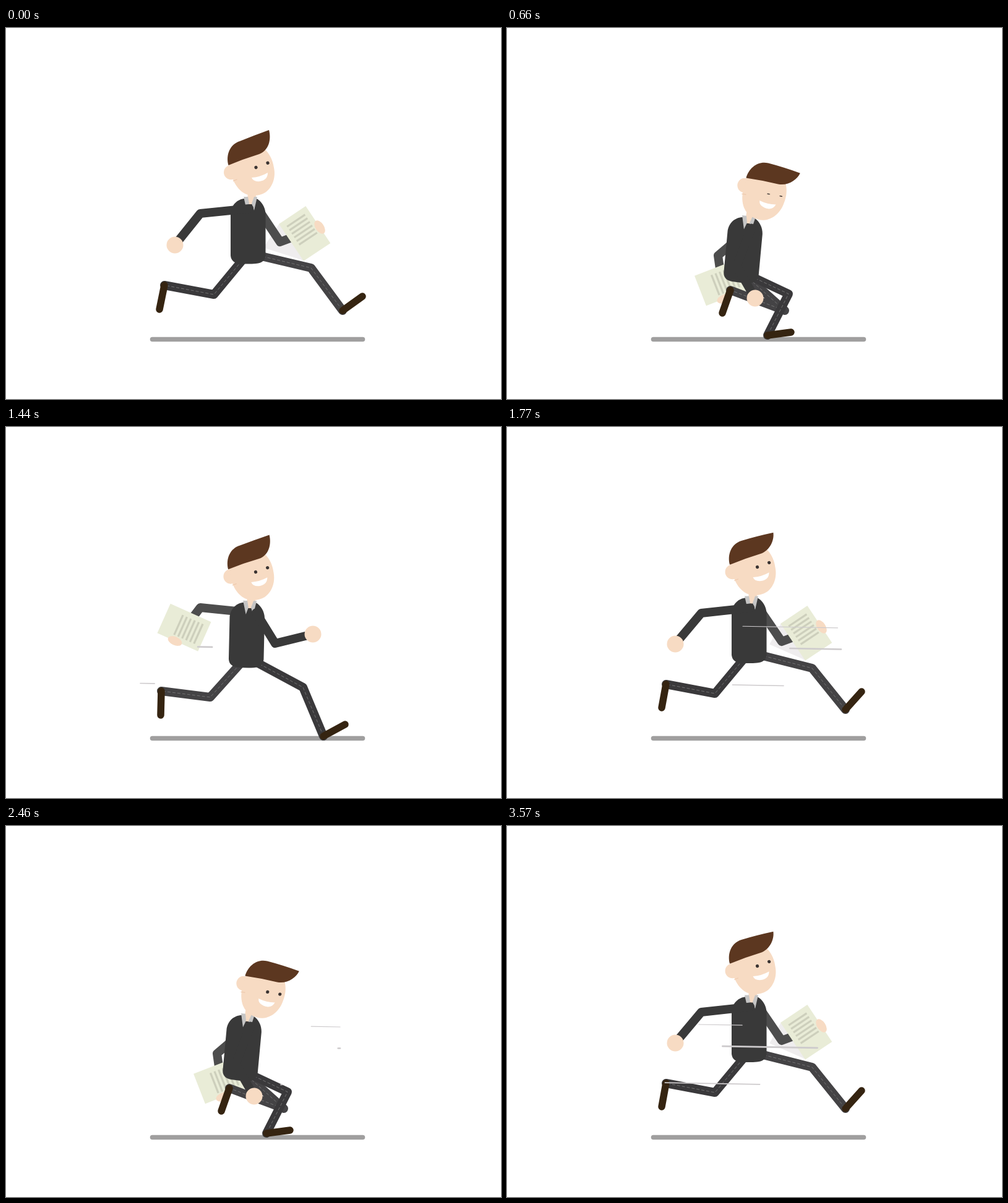
Animation, 800 px wide and 600 px high, one loop 3600 ms. Source, as an HTML page with a canvas:

```html
<!DOCTYPE html>
<html lang="en">
<head>
<meta charset="utf-8">
<title>Running man</title>
<style>
html, body { margin: 0; width: 100%; height: 100%; overflow: hidden; background: #fff; }
canvas { display: block; width: 800px; height: 600px; }
</style>
</head>
<body>
<canvas id="stage" width="800" height="600"></canvas>
<script>
const ctx = document.getElementById('stage').getContext('2d');
const LOOP = 3600, STRIDE = 900, STEP = 450, TICK = 30;
const SKIN = '#f7dbc3', SUIT = '#393939', SHOE = '#352411';
const mod = (a, n) => ((a % n) + n) % n;
const clamp = v => Math.min(1, Math.max(0, v));

// Periodic monotone cubic through (times, values); times start at 0.
function curve(times, values, period) {
  const n = times.length;
  const T = i => times[mod(i, n)] + period * Math.floor(i / n);
  const V = i => values[mod(i, n)];
  const slope = i => (V(i + 1) - V(i)) / (T(i + 1) - T(i));
  const tangent = i => {
    const a = slope(i - 1), b = slope(i);
    return a * b <= 0 ? 0 : 2 * a * b / (a + b);
  };
  return t => {
    t = mod(t, period);
    let i = n - 1;
    while (times[i] > t) i--;
    const h = T(i + 1) - T(i), u = (t - T(i)) / h, w = 1 - u;
    return V(i) * w * w * (1 + 2 * u) + V(i + 1) * u * u * (3 - 2 * u)
      + h * u * w * (w * tangent(i) - u * tangent(i + 1));
  };
}

// Body: both half strides share the same motion.
const bodyTimes = [0, 90, 210, 330, 420];
const body = {};
for (const [name, values] of Object.entries({
  x: [394, 393, 389.5, 392, 394],
  y: [278, 286, 309, 301, 278.4],
  tilt: [0, 1.3, 5.3, 4.2, 0],
  headX: [397, 395.6, 389.7, 390.2, 397.3],
  headY: [278, 286.9, 309.8, 300.8, 279],
  nod: [0, 1, 31, 31, 0.3],
  wag: [0, 0, 0.9, 1.1, 0.75]
})) body[name] = curve(bodyTimes, values, STEP);

function onTorso(t, dx, dy) {
  const a = body.tilt(t) * Math.PI / 180, c = Math.cos(a), s = Math.sin(a);
  return [body.x(t) + dx * c - dy * s, body.y(t) + dx * s + dy * c];
}
const hip = t => onTorso(t, -2.5, 86);
const shoulder = t => onTorso(t, 6 - 7 * Math.cos(2 * Math.PI * t / STRIDE), 14);

// Limb: joint positions per key time, interpolated as bone angles and lengths.
function limb(root, keys) {
  const times = keys.map(k => k[0]);
  const bones = [];
  for (let j = 1; j < keys[0].length; j += 2) {
    let last = null;
    const angles = [], lengths = [];
    for (const k of keys) {
      const [x, y] = j > 1 ? [k[j - 2], k[j - 1]] : root(k[0]);
      let a = Math.atan2(k[j + 1] - y, k[j] - x);
      if (last !== null) a -= 2 * Math.PI * Math.round((a - last) / (2 * Math.PI));
      angles.push(last = a);
      lengths.push(Math.hypot(k[j] - x, k[j + 1] - y));
    }
    bones.push([curve(times, angles, STRIDE), curve(times, lengths, STRIDE)]);
  }
  return (t, floor = 600) => {
    t = mod(t, STRIDE);
    const points = [root(t)];
    for (const [angle, length] of bones) {
      const [x, y] = points[points.length - 1], a = angle(t), l = length(t);
      points.push([x + l * Math.cos(a), Math.min(floor, y + l * Math.sin(a))]);
    }
    return points;
  };
}

// time, knee, ankle, toe
const leg = limb(hip, [
  [0, 336, 431, 256, 416, 248, 455],
  [90, 330, 437, 251, 427, 250, 466],
  [210, 449, 457, 361, 424, 348, 461],
  [330, 474, 380, 511, 450, 546, 432],
  [420, 493, 390, 547, 457, 573, 428],
  [450, 493, 388, 544, 457, 576, 434],
  [540, 480, 421, 513, 500, 548, 481],
  [660, 455, 430, 421, 497, 459, 492],
  [780, 333, 455, 258, 443, 262, 481],
  [870, 336, 431, 257, 416, 250, 454]
]);

// time, elbow, hand
const arm = limb(shoulder, [
  [0, 314, 300, 273, 351],
  [90, 314, 292, 273, 346],
  [210, 341, 368, 351, 438],
  [330, 430, 366, 488, 348],
  [420, 444, 347, 508, 323],
  [450, 443, 346, 507, 322],
  [540, 435, 350, 496, 335],
  [660, 371, 385, 401, 437],
  [780, 314, 310, 291, 373],
  [870, 314, 301, 272, 351]
]);

function line(points, color, width, dash = []) {
  ctx.beginPath();
  points.forEach(p => ctx.lineTo(...p));
  ctx.strokeStyle = color;
  ctx.lineWidth = width;
  ctx.setLineDash(dash);
  ctx.lineCap = dash.length ? 'butt' : 'round';
  ctx.lineJoin = 'round';
  ctx.stroke();
}
function fill(d, color) {
  ctx.fillStyle = color;
  ctx.fill(new Path2D(d));
}
function oval(x, y, rx, ry, color, turn = 0) {
  ctx.beginPath();
  ctx.ellipse(x, y, rx, ry, turn, 0, 2 * Math.PI);
  ctx.fillStyle = color;
  ctx.fill();
}
// Draws with the local pivot (px, py) placed at (x, y) and turned.
function place(x, y, angle, px, py, draw) {
  ctx.save();
  ctx.translate(x, y);
  ctx.rotate(angle);
  ctx.translate(-px, -py);
  draw();
  ctx.restore();
}

function drawLeg(t, color) {
  const [h, knee, ankle, toe] = leg(t, 500);
  line([h, knee, ankle], color, 14);
  line([h, knee, ankle], '#767676', 0.9, [5, 3]);
  line([ankle, toe], SHOE, 11.5);
}

function drawPaperArm(t) {
  const [s, elbow, hand] = arm(t + STEP);
  const turn = Math.atan2(hand[1] - elbow[1], hand[0] - elbow[0]) - 1.8;
  const p = mod(t, STRIDE), open = clamp(1 - Math.min(p, STRIDE - p) / 150);
  const wrist = [elbow[0] + (hand[0] - elbow[0]) * 0.6, elbow[1] + (hand[1] - elbow[1]) * 0.6];
  const held = draw => place(...hand, turn, -4.8, 26, draw);
  if (open) held(() => fill(`M36,-25 L-36,-25 L18,${-25 - 43 * open} Z`, '#efedee'));
  line([s, elbow, wrist], '#4d4d4d', 14);
  held(() => {
    fill('M-36,-26 L36,-26 L36,26 L-36,26 Z', '#e9ecd7');
    for (let i = 0; i < 6; i++) fill(`M${-11.5 + 7 * i},-17.5 h3.2 v35 h-3.2 Z`, '#cdcfbc');
    oval(-4.8, 26, 12, 6.8, SKIN);
  });
}

function drawTorso(t) {
  place(body.x(t), body.y(t), body.tilt(t) * Math.PI / 180, 394, 278, () => {
    fill('M363,302 C363,288 372,278 384,276 L405,276 C413,280 419,290 419.5,300 L419.5,367 Q419,380 404,381 Q391,382 378,381 Q364,380 363,368 Z', SUIT);
    fill('M391,262 L404,262 L404,280 L398,285 L392,285 L390,280 Z', SKIN);
    fill('M384,273 L391,273 L393,284 L389,295 Z M406,273 L401,273 L397,284 L401,295 Z', '#c5c5c5');
  });
}

function drawHead(t, lid) {
  const w = 6 * body.wag(t);
  place(body.headX(t), body.headY(t), body.nod(t) * Math.PI / 180, 397, 278, () => {
    oval(363.8, 233.5, 11.8, 11.8, SKIN);
    fill('M361,220 C364,245 372,258 383,266 C392,272.5 408,273 419,266 C432,257 436,240 433,226 C431,212 425,202 417,195 Z', SKIN);
    line([[367, 247.5], [373, 245]], '#ecc5a8', 1);
    oval(404, 225.5, 2.6, 2.6 * lid, '#3b3432', -0.35);
    oval(423, 218.3, 2.6, 2.6 * lid, '#3b3432', -0.35);
    fill('M397,242 Q411,241 423,234 Q423,246 410,248 Q400,249 397,242 Z', '#fff');
    fill(`M359.5,222 C355,205 362,188 378,183 Q${400 + w / 2},${174 + w / 3} ${425 + w},${165 + w} C${429 + w / 2},${180 + w / 3} 425,198 409,204 Q383,212 359.5,222 Z`, '#5c3720');
  });
}

function drawNearArm(t) {
  const points = arm(t);
  line(points, SUIT, 14);
  oval(...points[2], 13.5, 13.5, SKIN);
}

// A streak grows from its right end, then shrinks into its left end.
function streak(t, start, length, x, y, width) {
  const u = (t - start) / length;
  if (u <= 0 || u >= 1) return;
  const at = k => [x + 230 * (1 - k), y + 4 * (1 - k)];
  line([at(clamp(u / 0.6)), at(clamp((u - 0.4) / 0.6))], '#cdcacc', width);
}

function draw(t) {
  ctx.fillStyle = '#fff';
  ctx.fillRect(0, 0, 800, 600);
  line([[236.5, 503.5], [576.5, 503.5]], '#a09f9f', 7.5);
  drawPaperArm(t);
  drawLeg(t + STEP, '#444345');
  drawLeg(t, '#3a393b');
  drawTorso(t);
  drawHead(t, 0.3 + 0.7 * clamp((Math.abs(t - 675) - 15) / 75));
  drawNearArm(t);
  for (const start of [895, 1645, 2455, 3280]) {
    streak(t, start - 45, 410, 310, 321, 1.2);
    streak(t, start, 580, 310, 355.5, 2.6);
    streak(t, start, 580, 217, 414.5, 1.6);
  }
}

function frame() {
  draw(Math.floor((performance.now() % LOOP) / TICK) * TICK);
  requestAnimationFrame(frame);
}
frame();
</script>
</body>
</html>
```
